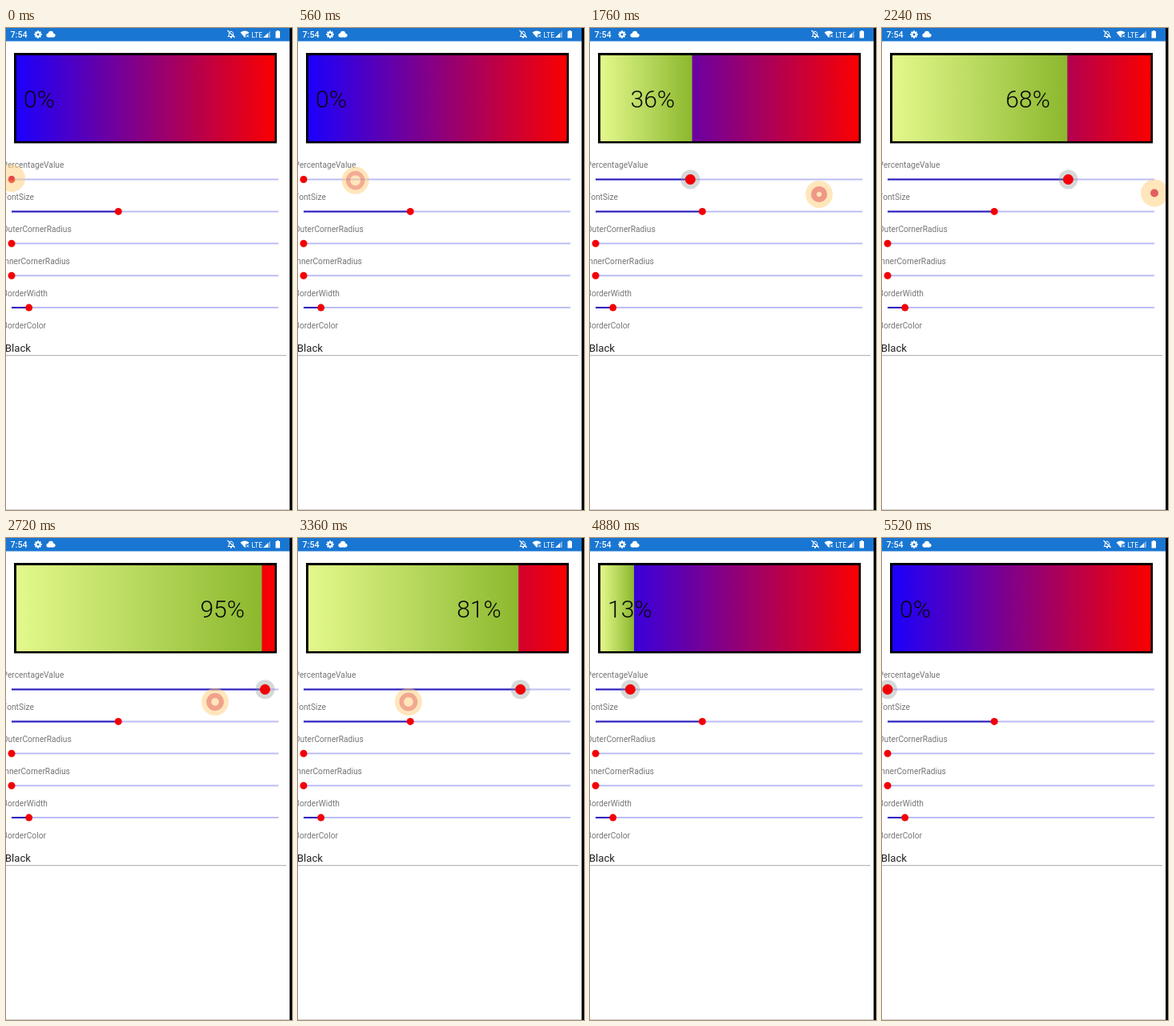
Recreate the animation shown at these times as an HTML page with a canvas. Size 357x600 px, loop 5.6 s.

```html
<!DOCTYPE html>
<html lang="en">
<head>
<meta charset="utf-8">
<title>Percentage bar</title>
<style>
  html, body { margin: 0; width: 100%; height: 100%; overflow: hidden; background: #fff; }
  canvas { display: block; width: 357px; height: 600px; }
</style>
</head>
<body>
<canvas id="stage" width="357" height="600"></canvas>
<script>
const ctx = document.getElementById('stage').getContext('2d');
const LOOP = 5600, STEP = 80, RIPPLE = 312;
const TRACK = { left: 7, right: 340 };
const BAR = { left: 13, top: 34, width: 322.5, height: 107 };

// [time, percent]
const VALUE = [[720, 0], [1040, 11.4], [1760, 35.5], [2480, 83.8], [2720, 95], [2880, 100],
  [3060, 100], [3440, 76.3], [4000, 41.45], [4720, 22.2], [4880, 13], [5200, 6.3], [5440, 0]];
// [time, position]
const TOUCH_X = [[0, 7], [320, 45], [1040, 125], [1760, 286], [2000, 324], [2160, 340],
  [2340, 340], [2720, 261], [3280, 145], [4000, 81], [4160, 50], [4480, 30], [4720, 7]];
const TOUCH_Y = [[0, 187], [1040, 192], [1760, 207], [2720, 204], [4000, 204], [4720, 200]];
const TOUCH_END = 4800;

function sample(keys, t) {
  if (t <= keys[0][0]) return keys[0][1];
  for (let i = 1; i < keys.length; i++) {
    const [t0, a] = keys[i - 1], [t1, b] = keys[i];
    if (t <= t1) return a + (b - a) * (t - t0) / (t1 - t0);
  }
  return keys[keys.length - 1][1];
}

function rect(x, y, w, h, fill) {
  ctx.fillStyle = fill;
  ctx.fillRect(x, y, w, h);
}

function disc(x, y, r, fill) {
  ctx.fillStyle = fill;
  ctx.beginPath();
  ctx.arc(x, y, r, 0, 2 * Math.PI);
  ctx.fill();
}

function line(points, color, width) {
  ctx.strokeStyle = color;
  ctx.lineWidth = width;
  ctx.beginPath();
  points.forEach(([x, y]) => ctx.lineTo(x, y));
  ctx.stroke();
}

function polygon(points, fill) {
  ctx.fillStyle = fill;
  ctx.beginPath();
  points.forEach(([x, y]) => ctx.lineTo(x, y));
  ctx.fill();
}

function text(str, x, y, size, color, weight = 400) {
  ctx.font = `${weight} ${size}px Roboto, sans-serif`;
  ctx.fillStyle = color;
  ctx.fillText(str, x, y);
}

function gradient(x0, x1, from, to) {
  const g = ctx.createLinearGradient(x0, 0, x1, 0);
  g.addColorStop(0, from);
  g.addColorStop(1, to);
  return g;
}

function gear(x, y) {
  for (let i = 0; i < 4; i++) {
    const a = i * Math.PI / 4, dx = 4.7 * Math.cos(a), dy = 4.7 * Math.sin(a);
    line([[x - dx, y - dy], [x + dx, y + dy]], '#fff', 2);
  }
  disc(x, y, 3.6, '#fff');
  disc(x, y, 1.5, '#1976d2');
}

function cloud(x, y) {
  disc(x - 3, y + 1, 2.6, '#fff');
  disc(x, y - 1, 3.2, '#fff');
  disc(x + 3.2, y + 1.2, 2.4, '#fff');
  rect(x - 3, y, 6, 3.6, '#fff');
}

function mutedBell(x, y) {
  line([[x - 4, y + 3], [x - 2.6, y + 1.5], [x - 2.6, y - 1], [x - 1, y - 3.2], [x + 1, y - 3.2],
    [x + 2.6, y - 1], [x + 2.6, y + 1.5], [x + 4, y + 3], [x - 4, y + 3]], '#fff', 1);
  disc(x, y + 4.2, 1.1, '#fff');
  line([[x - 4.5, y - 4.5], [x + 4.5, y + 4.5]], '#fff', 1.1);
}

function wifi(x, y) {
  ctx.fillStyle = '#fff';
  ctx.beginPath();
  ctx.moveTo(x, y + 4.5);
  ctx.lineTo(x - 5.5, y - 2);
  ctx.quadraticCurveTo(x, y - 6, x + 5.5, y - 2);
  ctx.fill();
  rect(x + 1, y, 5, 5, '#1976d2');
  line([[x + 2, y + 1], [x + 5, y + 4]], '#fff', 1);
  line([[x + 5, y + 1], [x + 2, y + 4]], '#fff', 1);
}

function statusBar() {
  rect(0, 0, 354, 16.5, '#1976d2');
  text('7:54', 5.5, 12, 10.7, '#fff', 500);
  gear(40, 8);
  cloud(56, 8);
  mutedBell(281, 7.5);
  wifi(298, 7.5);
  text('LTE', 306.5, 11.5, 8.8, '#fff');
  polygon([[321, 12], [330, 3.5], [330, 12]], 'rgba(255,255,255,.4)');
  polygon([[321, 12], [327, 6.3], [327, 12]], '#fff');
  rect(336.5, 4, 5.5, 8.5, '#fff');
  rect(338, 3, 2.5, 1, '#fff');
}

function percentageBar(percent) {
  const { left, top, width, height } = BAR;
  const filled = width * percent / 100, edge = left + filled;
  rect(10, 31, 328, 112.5, '#000');
  rect(left, top, width, height, gradient(left, left + width, '#1c00fc', '#fa0000'));
  if (filled > 0) rect(left, top, filled, height, gradient(left, edge, '#e3f98c', '#8cb82e'));

  const label = `${Math.max(0, Math.ceil(percent - 0.41))}%`;
  ctx.font = '300 30px Roboto, sans-serif';
  const x = Math.max(22, edge - 21.5 - ctx.measureText(label).width);
  text(label, x, 99, 30, '#080808', 300);
}

function slider(y, percent, active) {
  const { left, right } = TRACK;
  const x = left + (right - left) * percent / 100;
  line([[left, y], [right, y]], '#bcbef6', 2);
  line([[left, y], [x, y]], '#2a1cbc', 2);
  if (active) disc(x, y, 12, 'rgba(140,150,150,.36)');
  disc(x, y, active ? 6.5 : 4.5, '#f20006');
}

function touch(t) {
  const x = sample(TOUCH_X, t), y = sample(TOUCH_Y, t);
  const phase = t % RIPPLE / RIPPLE;
  const outer = 3 + 11 * phase, inner = Math.max(0, 22 * (phase - 0.5));
  disc(x, y, 17, 'rgba(255,205,120,.5)');
  ctx.fillStyle = `rgba(222,70,80,${1 - 0.8 * phase})`;
  ctx.beginPath();
  ctx.arc(x, y, outer, 0, 2 * Math.PI);
  ctx.arc(x, y, inner, 0, 2 * Math.PI, true);
  ctx.fill();
}

function draw(t) {
  const percent = sample(VALUE, t);
  rect(0, 0, 357, 600, '#fff');
  statusBar();
  percentageBar(percent);

  ['PercentageValue', 'FontSize', 'OuterCornerRadius', 'InnerCornerRadius', 'BorderWidth', 'BorderColor']
    .forEach((name, i) => text(name, -4.4, 174 + 39.9 * i, 10.2, '#757575'));
  [percent, 40, 0, 0, 6.5]
    .forEach((value, i) => slider(188.5 + 39.9 * i, value, i === 0 && t >= 720));

  text('Black', -1.2, 402.5, 13.2, '#212121');
  rect(0, 407, 350, 1.2, '#b8b8b8');
  rect(0, 599, 354, 1, '#d0d0d0');
  if (t < TOUCH_END) touch(t);
  rect(354, 0, 3, 600, '#000');
}

const start = performance.now();
function tick() {
  const elapsed = (performance.now() - start) % LOOP;
  draw(Math.floor(elapsed / STEP) * STEP);
  requestAnimationFrame(tick);
}
tick();
</script>
</body>
</html>
```
